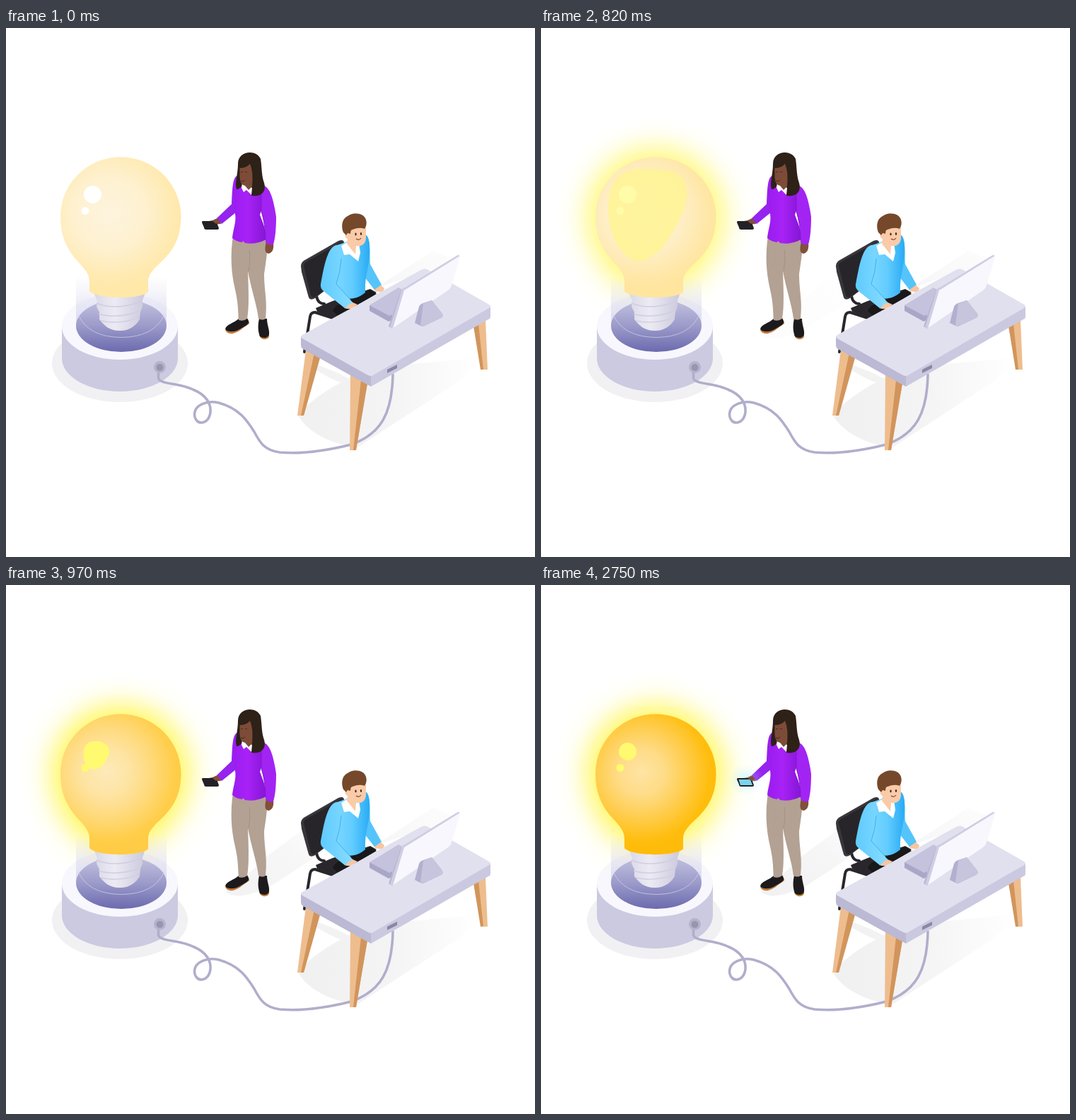
Animation, 748 px wide and 748 px high, one loop 3620 ms. Source, as an HTML page:

```html
<!DOCTYPE html>
<html lang="en">
<head>
<meta charset="utf-8">
<title>Bright idea</title>
<style>
html, body { margin: 0; width: 100%; height: 100%; overflow: hidden; background: #fff; }
svg { display: block; width: 100vw; height: 100vh; }
</style>
</head>
<body>
<svg viewBox="0 0 748 748">
<defs>
  <radialGradient id="off" gradientUnits="userSpaceOnUse" cx="146" cy="262" r="112">
    <stop offset="0" stop-color="#fdf4de"/><stop offset=".45" stop-color="#fef1d0"/>
    <stop offset=".85" stop-color="#ffe9ae"/><stop offset="1" stop-color="#ffe8a8"/>
  </radialGradient>
  <radialGradient id="on" gradientUnits="userSpaceOnUse" cx="142" cy="265" r="106">
    <stop offset="0" stop-color="#fee4a4"/><stop offset=".3" stop-color="#fedc88"/>
    <stop offset=".65" stop-color="#ffcb45"/><stop offset=".9" stop-color="#ffbe10"/>
    <stop offset="1" stop-color="#ffbb0a"/>
  </radialGradient>
  <linearGradient id="well" x2="0" y2="1">
    <stop offset="0" stop-color="#c3c2e0"/><stop offset=".5" stop-color="#9c9bca"/><stop offset="1" stop-color="#6c6aae"/>
  </linearGradient>
  <linearGradient id="tube" x2="0" y2="1">
    <stop offset="0" stop-color="#d3d2ec" stop-opacity="0"/><stop offset="1" stop-color="#d3d2ec" stop-opacity=".75"/>
  </linearGradient>
  <linearGradient id="screw">
    <stop offset="0" stop-color="#d9d8e7"/><stop offset=".4" stop-color="#ecebf4"/><stop offset="1" stop-color="#cbc9dc"/>
  </linearGradient>
  <linearGradient id="purple">
    <stop offset="0" stop-color="#9a1cf0"/><stop offset=".45" stop-color="#a822f6"/><stop offset="1" stop-color="#8415d4"/>
  </linearGradient>
  <linearGradient id="blue">
    <stop offset="0" stop-color="#7ed8ff"/><stop offset=".5" stop-color="#62ccff"/><stop offset="1" stop-color="#28abf5"/>
  </linearGradient>
  <linearGradient id="sleeve">
    <stop offset="0" stop-color="#5ecbff"/><stop offset="1" stop-color="#8adcff"/>
  </linearGradient>
  <linearGradient id="floor">
    <stop offset="0" stop-color="#f0f0f1"/><stop offset=".5" stop-color="#f4f4f5"/><stop offset="1" stop-color="#fff"/>
  </linearGradient>
  <linearGradient id="cast" x1="0" y1="1" x2="1" y2="0">
    <stop offset="0" stop-color="#f1f1f2"/><stop offset=".6" stop-color="#f6f6f7"/><stop offset="1" stop-color="#fdfdfd"/>
  </linearGradient>
  <radialGradient id="cool">
    <stop offset="0" stop-color="#8fe3ff" stop-opacity=".7"/><stop offset="1" stop-color="#b5eeff" stop-opacity="0"/>
  </radialGradient>
  <filter id="blur" filterUnits="userSpaceOnUse" x="-60" y="40" width="450" height="460"><feGaussianBlur stdDeviation="20"/></filter>
  <path id="bulb" d="M162 182.500C209 182.500 247.500 220 247.500 267C247.500 291 240 309 226 324C214 337 201 345 201 359V373C192 384 128 384 118 372V359C118 345 108 338 97 325C84 309 77 291 77 267C77 220 115 182.500 162 182.500Z"/>
</defs>

<!-- floor shadows -->
<path id="cast1" fill="url(#cast)" d="M311 434L345 406L368 384L443 329L449 377L371 428L345 437Q322 443 311 434Z"/>
<path fill="url(#floor)" d="M414 549C420 532 470 498 520 480L672 466Q652 490 640 500L497 593C455 588 424 568 414 549Z"/>
<path fill="url(#cast)" d="M424 470L470 488L515 512L470 500Q440 488 424 470ZM522 368L604 315L636 328L590 346Z"/>

<!-- base -->
<ellipse cx="161" cy="474" rx="96" ry="55" fill="#f1f1f4"/>
<path d="M79 422V467A82 47 0 0 0 243 467V422Z" fill="#cccae0"/>
<ellipse cx="161" cy="422" rx="82" ry="47" fill="#f7f7fd"/>
<path id="glow" filter="url(#blur)" fill="#fff650" stroke="#fff650" stroke-width="24" d="M162 182C209 182 247 220 247 267C247 308 222 330 201 354H118C102 334 77 308 77 267C77 220 115 182 162 182Z"/>
<rect x="99" y="352" width="128" height="69" fill="url(#tube)"/>
<ellipse cx="163" cy="421" rx="64" ry="37" fill="url(#well)"/>
<path d="M102 405Q116 437 163 437.500Q210 437 224 405" fill="none" stroke="#cfceea" stroke-width=".8"/>

<path fill="url(#screw)" d="M124 374L129 386L128 394L132 402L132 412C139 421 146 428 161 428C176 428 184 420 189 412L190 402L193 394L193 385L197 374Z"/>
<g fill="none" stroke="#d0cee0" stroke-width="1.500">
  <path d="M128 389C148 398 176 394 193 385M131 404C149 410 175 407 190 399M134 414C151 418 173 416 188 409"/>
</g>

<!-- bulb -->
<use href="#bulb" fill="url(#off)"/>
<use id="lit" href="#bulb" fill="url(#on)"/>
<path id="blob"/>
<g id="shine"><circle cx="122.500" cy="235.500" r="12.500"/><circle cx="112" cy="258.500" r="5.500"/></g>

<!-- cable -->
<path fill="none" stroke="#b0aecb" stroke-width="3.600" stroke-linecap="round" d="M215.500 486V495C217 504 246 502 264 511C284 519 290 532 289 543C287 562 267 563 266.500 546C267 533 284 526 301 530C330 538 341 555 351 571C359 586 365 597 387 600C420 603 452 598 488 589C531 574 546 544 547 490"/>
<circle cx="217.500" cy="479.500" r="8.500" fill="#b5b3cb"/><circle cx="217.500" cy="480" r="5" fill="#9795af"/>

<!-- standing woman -->
<g>
  <path fill="#c27c3c" d="M310 427Q312 433 321 432Q330 429 334 425L344 418V415L328 422ZM358 434Q360 441 367 440Q373 439 372 433Z"/>
  <path fill="#1c1a1d" d="M329 411C323 417 311 419 310 426C314 431 325 430 332 425C338 421 344 420 343 414L341 410ZM358 411C356 420 356 428 359 436C363 439 371 439 372 433C373 427 369 420 369 411Z"/>
  <path fill="#b3a193" d="M321 294C317 320 318 345 324 370C329 392 328 403 329 413Q336 415 341 411C344 395 343 370 342 344C347 370 355 393 357 411Q363 414 367 411C370 385 365 372 365 348C368 327 371 312 368 296Z"/>
  <path fill="none" stroke="#a39183" d="M343 344Q346 327 344 314"/>
  <path fill="#80503a" d="M368 302L378 304C379 312 377 318 371 319C365 318 366 311 368 302ZM303 267L292 272L287 273L290 278L304 277Z"/>
  <path fill="#9524ee" d="M327 209C320 211 320 230 319 249L298 269L305 277L326 260Z"/>
  <path fill="url(#purple)" d="M328 210L335 224L350 233L365 222C371 235 364 250 359 264C363 275 369 288 368 299Q352 307 338 304L335 301L334 303Q325 302 320 297C321 285 326 274 324 263C321 250 318 219 328 210Z"/>
  <path fill="#a224f3" d="M361 222C373 223 378 240 382 267C382 288 380 300 378 306Q372 308 367 303C368 284 364 272 361 259Z"/>
  <path fill="none" stroke="#8617d4" d="M361 235V259Q367 278 367 300"/>
  <path fill="#2d2118" d="M328 192C328 173 354 171 360 185C362 198 361 208 365 219C369 234 358 239 347 237L346 218L334 222Q331 228 326 228C323 220 328 207 328 192Z"/>
  <path fill="#fff" d="M334 219L348 226L347 236L340 229L336 232L333 226Z"/>
  <path fill="#7d4c38" d="M330.500 198Q340 198 345 192Q350 203 348 224L343 229L338 223Q331 222 330.500 211Z"/>
  <path fill="none" stroke="#49291e" d="M332 204L335 203M338 203L341 204M332 216Q335 218 338 215"/>
  <ellipse id="phoneGlow" cx="290" cy="276" rx="26" ry="22" fill="url(#cool)"/>
  <path fill="#242126" d="M278 273H296Q298 273 298 275L301 283Q301 285 299 285H283Q280 285 280 282L277 275Q277 273 278 273Z"/>
  <path id="screen" d="M279.500 275H296L299 283H282Z"/>
  <path fill="#80503a" d="M292 273L299 270L303 274L297 277Z"/>
</g>

<!-- chair and seated man -->
<g>
  <path fill="none" stroke="#29272c" stroke-width="4" stroke-linecap="round" stroke-linejoin="round" d="M439 379Q441 390 450 390M422 458L430 408Q431 402 437 402L462 410"/>
  <path fill="#38363b" d="M417 337Q417 332 421 329L470 301Q477 298 478 303V350L437 382Q430 386 428 381L418 345Z"/>
  <path fill="#272529" d="M421 336Q421 333 424 331L474 303L478 306V350L439 379Q433 383 431 378Z"/>
  <path fill="#29272c" d="M438 396L462 386L515 369L524 374L466 411L440 401Z"/>
  <path fill="#19181b" d="M462 400Q466 390 480 388L515 370L524 376L470 408Z"/>
  <path fill="#f7c5a0" d="M477 389L488 387L497 391L489 397L481 397ZM518 366L528 362L535 368L533 374L522 372Z"/>
  <path fill="#55c4fb" d="M504 291C516 291 514 310 515 334L531 363L521 370L506 351Z"/>
  <path fill="url(#blue)" d="M465 308L480 303L504 291C514 291 515 306 514 322C513 340 507 350 508 374C495 386 478 384 466 376Z"/>
  <path fill="url(#sleeve)" d="M469 307C455 307 450 335 445 362Q444 368 449 372L480 397Q484 389 491 389L467 362C473 343 476 322 469 307Z"/>
  <path fill="none" stroke="#39b3f2" d="M474 326Q473 345 467 362L487 384"/>
  <path fill="#fff" d="M474 308L482 303L499 304L501 318L498 330L486 320L478 321Z"/>
  <path fill="#f9cba8" d="M480 288L484 281L509 279V296C509 307 501 309 495 308L494 320L482 305L483 298Q478 297 480 288Z"/>
  <path fill="#75482b" d="M477 289C473 279 476 269 483 266C491 259 507 262 509 271Q511 279 507 284Q500 281 490 285Q487 285 487 291L483 290L481 293Z"/>
  <g fill="#3a2520"><ellipse cx="494.500" cy="291.500" rx="1.100" ry="2"/><ellipse cx="502" cy="291" rx="1.100" ry="2"/></g>
  <path fill="none" stroke="#8c402f" stroke-width="1.200" d="M495 298Q499 301 502 297"/>
</g>

<!-- desk -->
<g>
  <path fill="#eebd8e" d="M424 455L445 462L421 548H412ZM487 490L511 502L495 597H486ZM661 421L678 413L681 483H672Z"/>
  <path fill="#d1955c" d="M436 459L445 463L421 548L417 548ZM502 498L511 503L495 597H491ZM661 421L668 418L675 483H671Z"/>
  <path fill="#bbb9d3" d="M417 436L516 492V507L420 454Q417 452 417 449Z"/>
  <path fill="#cbc9e0" d="M516 492L685 393V408Q685 411 682 412L516 507Z"/>
  <path fill="#e1e0ee" d="M419 434L587 342Q592 339 597 342L683 391Q687 394 683 396L519 491Q516 493 512 491L419 439Q415 437 419 434Z"/>
  <path fill="#8987a4" d="M539 483L553 476V481L539 488Z"/>
  <path fill="#c4c2dc" d="M514 392L555 367L567 374L552 403L542 408Z"/>
  <path fill="#a9a7c8" d="M514 392L542 407L546 405V413L541 415L514 400Z"/>
  <path fill="#b7b5d1" d="M559 370L562 367L546 425L541 422Z"/>
  <path fill="#f7f7fd" d="M560 369L640 320L642 324L630 364Q629 368 625 371L546 425Z"/>
  <path fill="#cfcde2" d="M560 369L639 321L642 322L563 371L547 425L543 423Z"/>
  <path fill="#b2b0ce" d="M584 394Q586 390 590 389L602 385L617 404Q619 408 615 410L594 420Q590 423 586 421L578 417Z"/>
  <path fill="#c7c5dd" d="M590 390L602 385L617 404Q619 408 615 410L594 420Q589 422 586 420Z"/>
</g>
</svg>
<script>
const LOOP = 3620, STEP = 30;
const $ = id => document.getElementById(id);

// [time, value] pairs
const glow = [[760, .35], [820, .8], [910, 1]];
const shade = [[760, 0], [820, .2], [910, .7], [1000, 1]];
const warm = [[760, .2], [820, .6], [910, 1]];
const veil = [[760, .25], [820, .85], [910, 1]];
const phone = [[2510, .1], [2750, 1]];

const wide = [[93, 235], [112, 203], [150, 198], [199, 204], [210, 240], [190, 284], [168, 318], [132, 336], [98, 297]];
const small = [[106, 236], [112, 217], [138, 212], [161, 218], [176, 237], [160, 262], [144, 285], [120, 290], [105, 268]];
const spot = wide.map((_, i) => {
  const a = Math.PI + i * Math.PI * 2 / wide.length;
  return [122.5 + 12 * Math.cos(a), 235.5 + 12 * Math.sin(a)];
});

const mix = (a, b, k) => a + (b - a) * k;
const ramp = (t, a, b) => Math.min(1, Math.max(0, (t - a) / (b - a)));
const ease = k => (1 - Math.cos(Math.PI * k)) / 2;
const blend = (a, b, k) => a.map((p, i) => p.map((v, j) => mix(v, b[i][j], k)));
const tint = (a, b, k) => `rgb(${a.map((v, i) => Math.round(mix(v, b[i], k)))})`;

function at(keys, t) {
  if (t < keys[0][0]) return 0;
  for (let i = 1; i < keys.length; i++) {
    const [t0, a] = keys[i - 1], [t1, b] = keys[i];
    if (t < t1) return mix(a, b, (t - t0) / (t1 - t0));
  }
  return keys[keys.length - 1][1];
}

function outline(pts) {
  const mid = i => {
    const a = pts[i % pts.length], b = pts[(i + 1) % pts.length];
    return [(a[0] + b[0]) / 2, (a[1] + b[1]) / 2];
  };
  return `M${mid(pts.length - 1)}` + pts.map((p, i) => `Q${p} ${mid(i)}`).join("") + "Z";
}

function draw(time) {
  const t = 10 + Math.floor((time - 10) / STEP) * STEP;
  $("glow").style.opacity = at(glow, t);
  $("lit").style.opacity = ease(ramp(t, 760, 1120));
  $("cast1").style.opacity = at(shade, t);
  $("shine").style.fill = tint([255, 255, 255], [255, 250, 112], at(warm, t));

  const pts = t < 910 ? blend(wide, small, ramp(t, 820, 910)) : blend(small, spot, ramp(t, 910, 1000));
  $("blob").setAttribute("d", outline(pts));
  $("blob").style.fill = tint([255, 245, 148], [255, 250, 112], ramp(t, 820, 910));
  $("blob").style.opacity = at(veil, t);

  const p = at(phone, t);
  $("phoneGlow").style.opacity = p * .6;
  $("screen").style.fill = tint([36, 33, 38], [126, 218, 246], p);
}

const start = performance.now();
function tick() {
  draw((performance.now() - start) % LOOP);
  requestAnimationFrame(tick);
}
tick();
</script>
</body>
</html>
```
